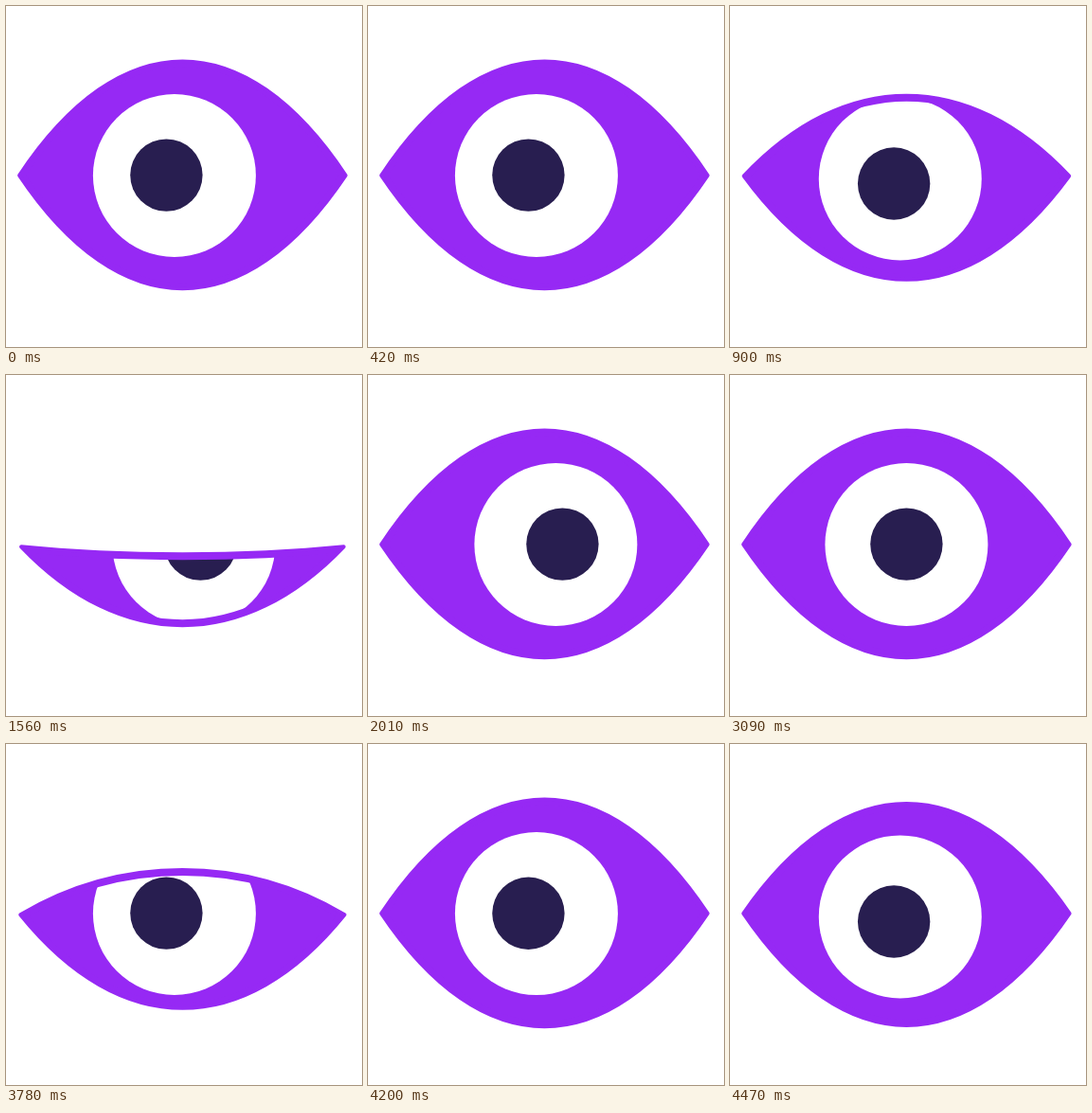
Animation, 376 px wide and 360 px high, one loop 4.5 s. Source, as an HTML page with a canvas:

```html
<!DOCTYPE html>
<html lang="en">
<head>
<meta charset="utf-8">
<title>Blinking eye</title>
<style>
  html, body { margin: 0; width: 100%; height: 100%; overflow: hidden; background: #fff; }
  canvas { display: block; }
</style>
</head>
<body>
<canvas id="stage" width="376" height="360"></canvas>
<script>
const ctx = document.getElementById('stage').getContext('2d');
const LOOP = 4500, STEP = 30, CYCLE = 3540;
const PURPLE = '#9629f4', DARK = '#281e50';
const CX = 186.4, CY = 178.8;

// Moments at which the lid is fully closed, within one cycle.
const BLINKS = [152, 789, 1607, 2454, 3288];
const CLOSING = 130, OPENING = 157;

// Gaze: time, distance from the centre, direction in degrees.
const GAZE = [
  [0, 17, 180], [640, 17, 180], [890, 16, 146], [950, 16, 146],
  [1450, 19, 0], [2330, 19, 0], [2480, 0, 0],
  [3180, 0, 180], [3400, 17, 180], [CYCLE, 17, 180]
];

const mix = (a, b, p) => a + (b - a) * p;
const ease = p => (1 - Math.cos(Math.PI * p)) / 2;

function lidAt(t) {
  return Math.max(...BLINKS.map(peak => {
    const d = Math.abs(t - peak) / (t < peak ? CLOSING : OPENING);
    return d < 1 ? ease(1 - d) : 0;
  }));
}

function gazeAt(t) {
  const i = GAZE.findIndex(key => key[0] > t);
  const [t0, r0, a0] = GAZE[i - 1], [t1, r1, a1] = GAZE[i];
  const p = ease((t - t0) / (t1 - t0));
  const r = mix(r0, r1, p), a = mix(a0, a1, p) * Math.PI / 180;
  return [r * Math.cos(a), r * Math.sin(a)];
}

function eyeShape(closed) {
  const half = 172.3 - 2.8 * closed, y = CY + 3.5 * closed;
  const top = 58.4 + 184 * closed, bottom = 298.2 - 47.8 * closed;
  const shape = new Path2D();
  const lid = (middle, side) => {
    const pull = side * half * 0.38, peak = y + (middle - y) * 4 / 3;
    shape.bezierCurveTo(CX - pull, peak, CX + pull, peak, CX + side * half, y);
  };
  shape.moveTo(CX - half, y);
  lid(top, 1);
  lid(bottom, -1);
  shape.closePath();
  return shape;
}

function disc(x, y, r, color) {
  ctx.fillStyle = color;
  ctx.beginPath();
  ctx.arc(x, y, r, 0, 2 * Math.PI);
  ctx.fill();
}

function outline(shape, width) {
  ctx.lineWidth = width;
  ctx.stroke(shape);
}

function draw(t) {
  const shape = eyeShape(lidAt(t)), [x, y] = gazeAt(t);
  const follow = x > 0 ? 0.63 : 0.5;
  ctx.clearRect(0, 0, 376, 360);
  ctx.strokeStyle = PURPLE;
  ctx.lineJoin = 'round';

  ctx.save();
  ctx.clip(shape);
  ctx.fillStyle = PURPLE;
  ctx.fill(shape);
  disc(CX + x * follow, 179 + y * 0.38, 86, '#fff');
  disc(CX + x, 178.6 + y, 38.2, DARK);
  outline(shape, 12);
  ctx.restore();
  outline(shape, 4);
}

function frame() {
  const t = performance.now() % LOOP;
  draw(Math.floor(t / STEP) * STEP % CYCLE);
  requestAnimationFrame(frame);
}
frame();
</script>
</body>
</html>
```
